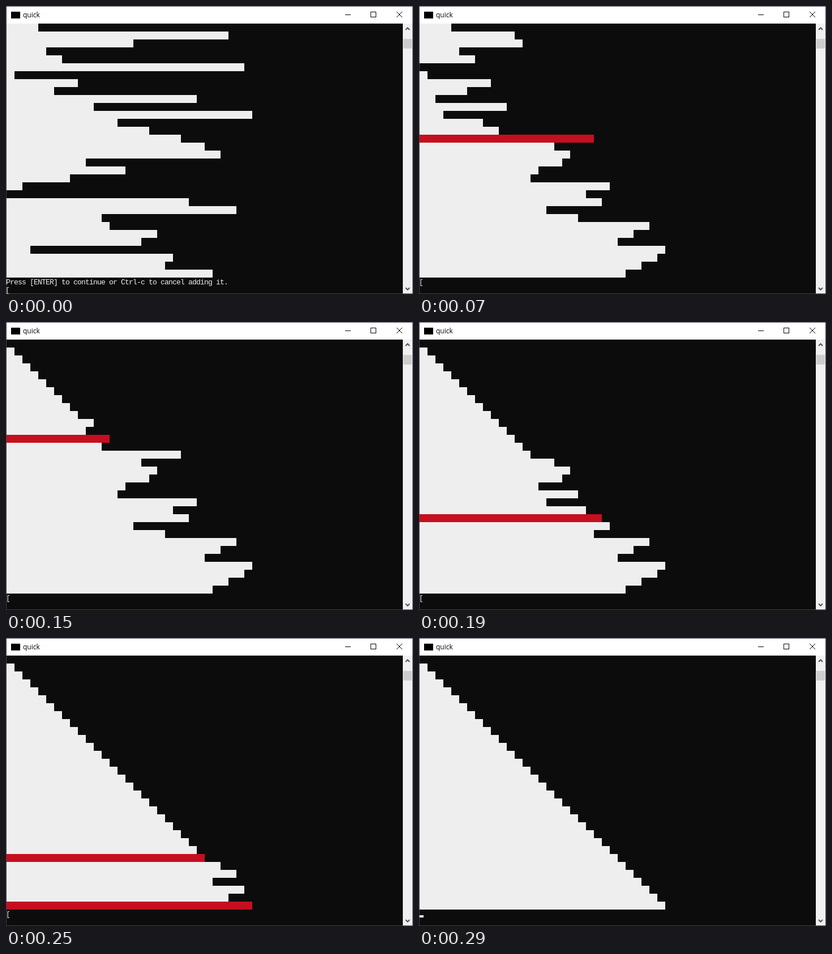
Write an HTML page with a canvas that moves like this. It is 719 px wide and 508 px high and loops after 0.5 s.

```html
<!DOCTYPE html>
<html lang="en">
<head>
<meta charset="utf-8">
<title>quick</title>
<style>
  html, body { margin: 0; width: 100%; height: 100%; overflow: hidden; background: #fff; }
  canvas { display: block; }
</style>
</head>
<body>
<canvas id="stage" width="719" height="508"></canvas>
<script>
const ctx = document.getElementById('stage').getContext('2d');
const CELL = 14, LEFT = 1, TOP = 31, LOOP = 500;
const BAR = '#eee', RED = '#c50f1f', BACK = '#0c0c0c';
const PROMPT = 'Press [ENTER] to continue or Ctrl-c to cancel adding it.';

const shuffled = [4, 28, 16, 5, 7, 30, 1, 9, 6, 24, 11, 31, 14, 18, 22, 25,
                  27, 10, 15, 8, 2, 0, 23, 29, 12, 13, 19, 17, 3, 21, 20, 26];
const sorted = shuffled.map((_, i) => i);
const last = shuffled.length - 1;

// Quicksort that records the list after every partition.
const steps = [];
function quicksort(list, lo, hi) {
  const pivot = list[(lo + hi) >> 1];
  let i = lo, j = hi;
  while (i <= j) {
    while (list[i] < pivot) i++;
    while (list[j] > pivot) j--;
    if (i <= j) {
      [list[i], list[j]] = [list[j], list[i]];
      i++;
      j--;
    }
  }
  const mark = j === lo ? j : i;
  const previous = steps.length ? steps[steps.length - 1].marks[0] : -1;
  // A highlight on the bottom row lingers for one step.
  steps.push({ list: [...list], marks: previous === last ? [mark, last] : [mark] });
  if (lo < j) quicksort(list, lo, j);
  if (i < hi) quicksort(list, i, hi);
}
quicksort([...shuffled], 0, last);

// Partitions finished at each 20 ms screen refresh, starting at 70 ms.
const progress = [2, 5, 8, 10, 12, 15, 17, 20, 23, 27, 30];

function rect(color, x, y, w, h) {
  ctx.fillStyle = color;
  ctx.fillRect(x, y, w, h);
}

function line(color, width, ...points) {
  ctx.strokeStyle = color;
  ctx.lineWidth = width;
  ctx.beginPath();
  for (const [x, y] of points) ctx.lineTo(x, y);
  ctx.stroke();
}

function consoleText(text, x, row) {
  ctx.font = '13px "Liberation Mono", monospace';
  ctx.letterSpacing = '-0.8px';
  ctx.fillStyle = '#f2f2f2';
  ctx.fillText(text, x, TOP + row * CELL + 12);
}

function drawWindow() {
  rect('#43435a', 0, 0, 719, 508);
  rect('#fff', 1, 1, 717, 30);
  rect(BACK, 1, TOP, 700, 476);
  rect('#000', 9, 10, 16, 12);

  ctx.font = '12px "Open Sans", "Noto Sans", sans-serif';
  ctx.letterSpacing = '0px';
  ctx.fillStyle = '#000';
  ctx.fillText('quick', 30, 20);

  rect('#000', 599, 15, 10, 1);
  ctx.strokeStyle = '#000';
  ctx.lineWidth = 1;
  ctx.strokeRect(644.5, 10.5, 9, 9);
  line('#000', 1, [690, 10], [700, 20]);
  line('#000', 1, [700, 10], [690, 20]);

  rect('#f0f0f0', 701, TOP, 17, 476);
  rect('#cdcdcd', 702, 58, 15, 17);
  line('#505050', 2, [706, 42], [709.5, 38.5], [713, 42]);
  line('#505050', 2, [706, 497], [709.5, 500.5], [713, 497]);
}

function drawBars(list, marks = [], scroll = 0) {
  list.forEach((value, i) => {
    if (i >= scroll) {
      rect(marks.includes(i) ? RED : BAR, LEFT, TOP + (i - scroll) * CELL, value * CELL, CELL);
    }
  });
}

function draw(t) {
  drawWindow();
  if (t < 70) {
    const scroll = t < 50 ? 0 : 1;
    drawBars(shuffled, [], scroll);
    consoleText(PROMPT, 0, 32 - scroll);
    consoleText('[', -1, 33 - scroll);
    return;
  }
  const done = progress[Math.floor((t - 70) / 20)];
  if (done) {
    const { list, marks } = steps[done - 1];
    drawBars(list, marks);
    consoleText('[', 0, 32);
  } else {
    drawBars(sorted);
    rect('#fff', 1, 489, 7, 4);
  }
}

function tick() {
  draw(performance.now() % LOOP);
  requestAnimationFrame(tick);
}
tick();
</script>
</body>
</html>
```
